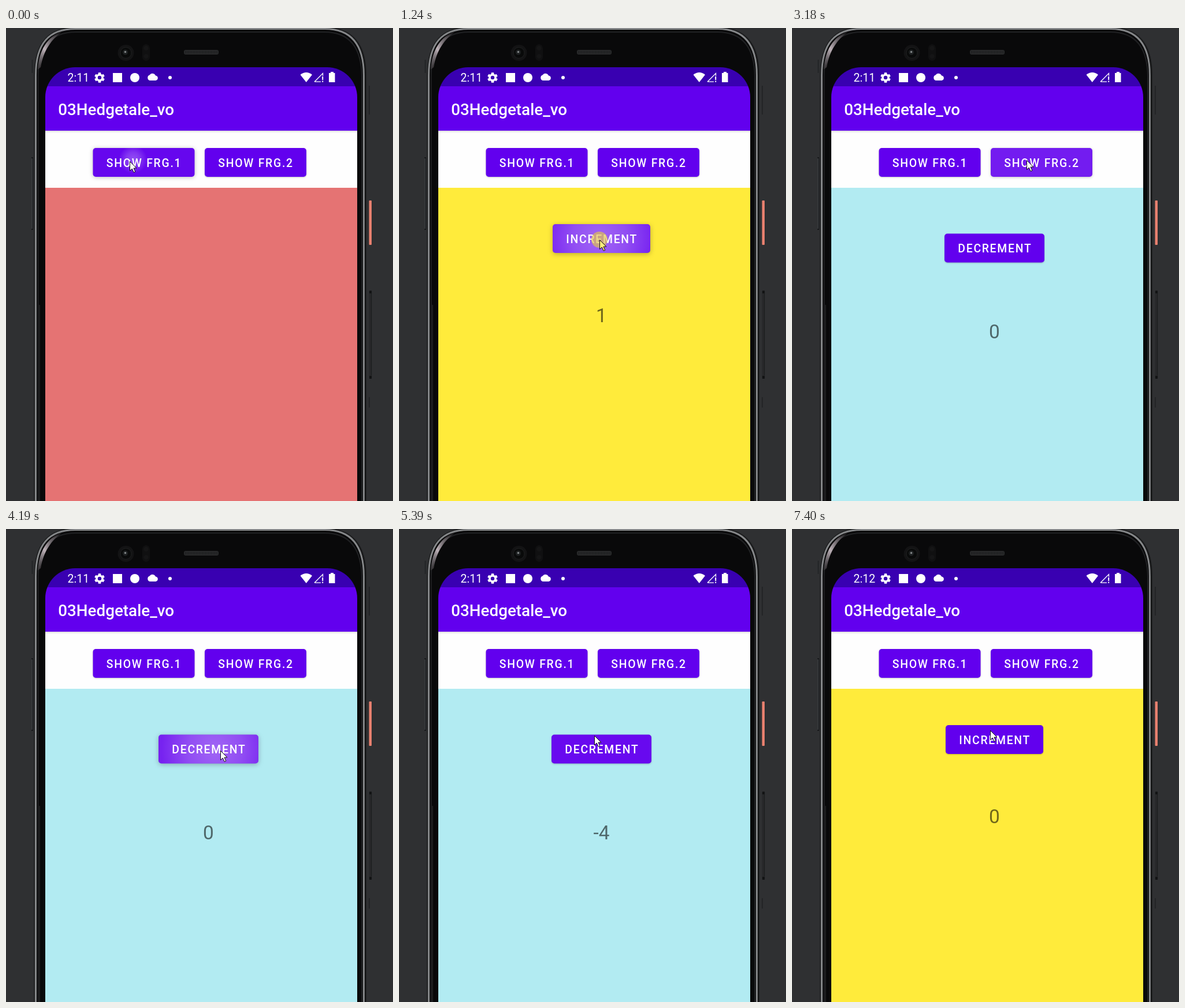
Animation of 670x820 px, one loop 7.44 s. Source, as an HTML page:

```html
<!DOCTYPE html>
<html lang="en">
<head>
<meta charset="utf-8">
<title>Fragment demo</title>
<style>
  html, body { margin: 0; width: 100%; height: 100%; overflow: hidden; background: #2f3032; }
  svg { display: block; width: 670px; height: 820px; }
  text { font-family: Roboto, "Noto Sans", sans-serif; }
  .label { font-size: 19.4px; font-weight: 500; letter-spacing: 1.73px; fill: #fff; }
  .count { font-size: 33.4px; fill: rgba(0, 0, 0, .56); text-anchor: middle; }
</style>
</head>
<body>
<svg id="stage" viewBox="0 0 670 820">
  <defs>
    <radialGradient id="glow">
      <stop offset="0" stop-color="#fff" stop-opacity=".31"/>
      <stop offset=".5" stop-color="#fff" stop-opacity=".2"/>
      <stop offset="1" stop-color="#fff" stop-opacity="0"/>
    </radialGradient>
    <linearGradient id="shine" x1="0" y1="1" x2="1" y2="0">
      <stop offset="0" stop-color="#8a8288" stop-opacity=".2"/>
      <stop offset=".4" stop-color="#cfc2c9" stop-opacity=".9"/>
      <stop offset="1" stop-color="#8a8288" stop-opacity=".05"/>
    </linearGradient>
    <linearGradient id="barShade" x1="0" y1="0" x2="0" y2="1">
      <stop offset="0" stop-opacity=".13"/>
      <stop offset="1" stop-opacity="0"/>
    </linearGradient>
    <clipPath id="screen"><rect x="68" y="68" width="540" height="900" rx="52"/></clipPath>
  </defs>

  <!-- side keys -->
  <path d="M45.5 224V350" stroke="#17181a" stroke-width="3"/>
  <path d="M45 226V348" stroke="#55575a"/>
  <path d="M45.5 55V78M629 100V150M629 640V658" stroke="#232426" stroke-width="2"/>
  <rect x="628.500" y="299" width="4.500" height="77" rx="1" fill="#e8806f"/>
  <rect x="628.500" y="455" width="5" height="153" rx="1.500" fill="#27282a"/>
  <path d="M631 455.500V460M631 603V608" stroke="#121314" stroke-width="4"/>
  <path d="M632.500 460V602" stroke="#1b1c1d"/>

  <!-- body -->
  <path d="M49.500 830V82C49.500 26 73 -.5 120 -.5H552C600 -.5 623 28 623 82V830Z" fill="#09090a" stroke="#1c1d1e" stroke-width="2"/>
  <path d="M51.500 830V82C51.500 27 74 1.500 120 1.500H552C598 1.500 619.500 29 619.500 82V830" fill="none" stroke="#858789" stroke-width="3"/>
  <path d="M55.500 830V86C55.500 33 77 7 121 7H551C594 7 616 33 616 86V830" fill="none" stroke="#202123" stroke-width="2"/>
  <path d="M58 480V820" stroke="#1d1e1f" stroke-width="2"/>
  <path d="M55 72C57 40 70 15 98 6C78 20 65 39 60 68Z" fill="url(#shine)"/>

  <!-- camera and speaker -->
  <circle cx="207.500" cy="43" r="14" fill="#131314"/>
  <circle cx="207.500" cy="43" r="9.500" fill="#090a0a" stroke="#1f2021"/>
  <circle cx="206.500" cy="42" r="4.500" fill="#1e2122"/>
  <circle cx="206.500" cy="41.500" r="1.700" fill="#858a8b"/>
  <rect x="236" y="28" width="13" height="29" rx="6.500" fill="#101011"/>
  <circle cx="242.500" cy="35" r="4" fill="#151516"/>
  <circle cx="242.500" cy="49" r="4" fill="#151516"/>
  <rect x="308" y="38" width="60" height="8" rx="3" fill="#2a2b2c"/>
  <path d="M310 42H366" stroke="#18191a" stroke-width="5" stroke-dasharray="1 1.500"/>

  <g clip-path="url(#screen)">
    <rect id="pane" x="68" y="277" width="540" height="543"/>
    <rect x="68" y="178" width="540" height="99" fill="#fefefe"/>
    <rect x="68" y="178" width="540" height="4" fill="url(#barShade)"/>
    <rect x="68" y="101" width="540" height="77" fill="#6200ee"/>
    <rect x="68" y="68" width="540" height="33" fill="#3900b1"/>
    <text x="90.200" y="150.500" font-size="27.800" font-weight="500" fill="#fff">03Hedgetale_vo</text>

    <g fill="#fff">
      <text id="clock" x="106.500" y="93" font-size="19.500"></text>
      <g id="gear" transform="translate(162 86)"></g>
      <rect x="185" y="78" width="16" height="16"/>
      <circle cx="223" cy="86" r="8"/>
      <path d="M249 91a5 5 0 0 1-.5-9.500 6 6 0 0 1 10.500 1 4.300 4.300 0 0 1 .3 8.500Z"/>
      <circle cx="284" cy="86" r="3"/>
      <path d="M509.500 81Q520 73 530 81L519.800 94Z"/>
      <path d="M534 93.200L548.500 78.500V83M534 93.200H545" fill="none" stroke="#fff" stroke-width="1.300"/>
      <path d="M547.200 84h2v6h-2zM547.200 91.500h2v2.200h-2z"/>
      <path d="M562 76h5v2h2.500v16h-10.500v-16h3z"/>
    </g>
    <g id="buttons"></g>
    <text id="count" class="count" x="350.500"></text>
  </g>

  <g id="cursor">
    <circle id="halo" r="14" fill="rgb(226,200,70)" fill-opacity=".65"/>
    <path id="arrow" d="M.5 .5V16.500L4.300 13L7.200 19.300L9.800 18.200L7 12H12Z" stroke="#111" stroke-width="1"/>
  </g>
</svg>

<script>
const LOOP = 7440;
const $ = id => document.getElementById(id);
const clamp = v => Math.max(0, Math.min(1, v));
const ease = p => p * p * (3 - 2 * p);

// Moving spans; the picture rests between them.
const spans = [[0, 490], [730, 1440], [1490, 1810], [2400, 3100], [3150, 3680],
  [3840, 4570], [4670, 5390], [5540, 6260], [6300, 6460], [6910, 7440]];

const buttons = {
  one: { x: 150.5, y: 208, w: 176, label: "SHOW FRG.1" },
  two: { x: 344, y: 208, w: 176, label: "SHOW FRG.2" },
  inc: { x: 266, y: 340, w: 169, label: "INCREMENT" },
  dec: { x: 264, y: 356.5, w: 173, label: "DECREMENT" }
};

const panes = [
  { at: 0, color: "#e57373" },
  { at: 120, color: "#ffeb3b", button: "inc", y: 510 },
  { at: 3150, color: "#b2ebf2", button: "dec", y: 538 },
  { at: 6300, color: "#ffeb3b", button: "inc", y: 510 }
];

const counts = [[0, "0"], [1100, "1"], [1300, "2"], [3150, "0"],
  [4260, "-1"], [4480, "-2"], [4760, "-3"], [4980, "-4"], [6300, "0"]];

const presses = [
  { id: "one", down: -50, up: -10, x: 220, y: 228 },
  { id: "inc", down: 940, up: 1310, x: 347, y: 365 },
  { id: "two", down: 2880, up: 2930, x: 406, y: 230 },
  { id: "dec", down: 3880, up: 4970, x: 362, y: 382 },
  { id: "one", down: 6160, up: 6230, x: 225, y: 233 }
];

const halos = [[1030, 1110], [1210, 1290], [3050, 3140], [4220, 4280],
  [4420, 4480], [4700, 4760], [4920, 4980], [6260, 6340]];

const track = [[0, 214, 231], [730, 214, 231], [980, 347, 367], [2390, 347, 367],
  [2400, 352, 359], [2820, 406, 229], [3400, 406, 229], [3680, 375, 373],
  [3840, 375, 373], [4150, 371, 384], [5050, 371, 384], [5390, 338, 358],
  [5540, 338, 358], [6150, 225, 233], [6910, 225, 233], [7400, 343, 349]];

$("gear").innerHTML = Array.from({ length: 6 }, (_, i) =>
  `<rect x="-2.300" y="-8.800" width="4.600" height="5" rx=".6" transform="rotate(${i * 60})"/>`).join("") +
  `<circle r="5" fill="none" stroke="#fff" stroke-width="3.600"/>`;

$("buttons").innerHTML = Object.entries(buttons).map(([id, b]) => {
  const box = `<rect x="${b.x}" y="${b.y}" width="${b.w}" height="50" rx="5"`;
  return `<g id="${id}">
    <clipPath id="${id}-clip">${box}/></clipPath>
    ${box} id="${id}-base" fill="#6200ee"/>
    ${box} id="${id}-veil" fill="#fff"/>
    <g clip-path="url(#${id}-clip)"><circle id="${id}-glow" fill="url(#glow)"/></g>
    <text class="label" x="${b.x + 23.3}" y="${b.y + 32.6}">${b.label}</text>
  </g>`;
}).join("");

function rest(t) {
  let held = 0;
  for (const [start, end] of spans) {
    if (t >= start) held = Math.min(t, end);
  }
  return held;
}

function cursorAt(t) {
  const i = track.findIndex(k => k[0] > t);
  if (i < 0) return track[track.length - 1].slice(1);
  const [a, b] = [track[i - 1], track[i]];
  const p = ease((t - a[0]) / (b[0] - a[0]));
  return [a[1] + (b[1] - a[1]) * p, a[2] + (b[2] - a[2]) * p];
}

function drawButton(id, t) {
  const press = presses.filter(p => p.id === id && p.down <= t).pop();
  let veil = 0, glow = 0;
  if (press) {
    const age = t - press.down, gone = t - press.up;
    veil = clamp(age / 250) * (1 - clamp((gone - 200) / 300));
    glow = 1 - clamp(gone / 250);
    const ring = $(id + "-glow");
    ring.setAttribute("cx", press.x);
    ring.setAttribute("cy", press.y);
    ring.setAttribute("r", 10 + 85 * clamp(age / 300));
  }
  $(id + "-veil").setAttribute("opacity", veil * .13);
  $(id + "-glow").setAttribute("opacity", glow);
  const lift = Math.max(glow, veil * .3);
  $(id + "-base").style.filter =
    `drop-shadow(0 ${1 + lift}px ${1.2 + 2.8 * lift}px rgba(0,0,0,${.22 + .04 * lift}))`;
}

function draw(time) {
  const t = rest(time);
  const pane = panes.filter(p => p.at <= t).pop();
  $("pane").setAttribute("fill", pane.color);
  $("inc").style.display = pane.button === "inc" ? "" : "none";
  $("dec").style.display = pane.button === "dec" ? "" : "none";
  Object.keys(buttons).forEach(id => drawButton(id, t));

  $("count").textContent = pane.button ? counts.filter(c => c[0] <= t).pop()[1] : "";
  $("count").setAttribute("y", pane.y || 0);
  $("clock").textContent = t < 5900 ? "2:11" : "2:12";

  const lit = halos.some(([a, b]) => t >= a && t < b);
  $("halo").style.display = lit ? "" : "none";
  $("arrow").setAttribute("fill", lit ? "#ffee7c" : "#fff");
  $("cursor").setAttribute("transform", `translate(${cursorAt(t)})`);
}

const begin = performance.now();
function tick() {
  draw((performance.now() - begin) % LOOP);
  requestAnimationFrame(tick);
}
tick();
</script>
</body>
</html>
```
